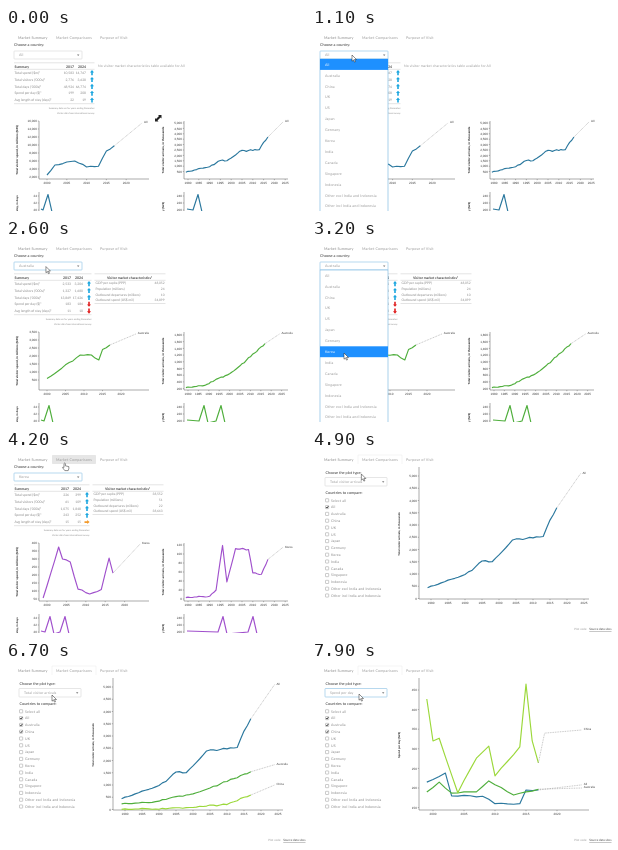
An HTML page for the animation above (8 s loop, 300 by 183 pixels).

```html
<!DOCTYPE html>
<html lang="en">
<head>
<meta charset="utf-8">
<title>Visitor market dashboard</title>
<style>
  html, body { margin: 0; width: 100%; height: 100%; overflow: hidden; background: #fff; }
  svg { display: block; width: 300px; height: 183px; font-family: Lato, "Open Sans", sans-serif; text-rendering: geometricPrecision; }
  .axis { font-family: "Liberation Sans", Arial, sans-serif; }
</style>
</head>
<body>
<svg id="stage" viewBox="0 0 300 183"></svg>
<script>
const LOOP = 8000;
const LAST_YEAR = 2017;
const FOCUS = '#6fb1dd';
const COLORS = { All: '#2b789e', Australia: '#4fae3c', China: '#9bd83a', Korea: '#a050cc' };
const COUNTRIES = ['All', 'Australia', 'China', 'UK', 'US', 'Japan', 'Germany', 'Korea', 'India',
  'Canada', 'Singapore', 'Indonesia', 'Other excl India and Indonesia', 'Other incl India and Indonesia'];
const PLOTS = ['Total visitor arrivals', 'Total spend', 'Spend per day', 'Total days', 'Length of stay'];

// Turning points by year; the years between are interpolated
const ARRIVALS = {
  All: { 1979: 440, 1988: 870, 1992: 1140, 1995: 1530, 1998: 1500, 2004: 2390, 2013: 2530, 2015: 3200, 2017: 3700, 2024: 5100 },
  Australia: { 1979: 230, 1987: 280, 1999: 610, 2005: 880, 2017: 1540, 2024: 1830 },
  China: { 1979: 5, 1997: 50, 2002: 130, 2010: 200, 2015: 500, 2017: 590, 2024: 1000 },
  Korea: { 1979: 3, 1990: 6, 1993: 20, 1996: 119, 1998: 38, 2002: 112, 2008: 110, 2010: 58, 2014: 55, 2017: 88, 2024: 115 }
};
const SPEND = {
  All: { 2000: 2500, 2002: 5000, 2007: 6000, 2010: 4500, 2013: 4700, 2015: 8500, 2017: 9800, 2024: 15500 },
  Australia: { 2000: 600, 2009: 2060, 2012: 2060, 2014: 1750, 2015: 2400, 2017: 2690, 2024: 3375 },
  Korea: { 1999: 56, 2003: 375, 2004: 300, 2006: 281, 2008: 112, 2011: 81, 2014: 110, 2016: 306, 2017: 212, 2024: 394 }
};
const DAILY = {
  All: { 1999: 215, 2002: 238, 2003: 180, 2008: 179, 2010: 160, 2014: 160, 2015: 195, 2017: 195, 2024: 208 },
  Australia: { 1999: 190, 2001: 215, 2003: 187, 2007: 190, 2009: 218, 2013: 182, 2017: 197, 2024: 200 },
  China: { 1999: 427, 2000: 320, 2001: 327, 2004: 188, 2007: 276, 2009: 307, 2010: 231, 2014: 305, 2015: 465, 2016: 320, 2017: 264, 2018: 340, 2024: 348 }
};

const stage = document.getElementById('stage');
const timed = [];

function el(parent, tag, attrs = {}, content) {
  const node = document.createElementNS('http://www.w3.org/2000/svg', tag);
  for (const key in attrs) node.setAttribute(key, attrs[key]);
  if (content !== undefined) node.textContent = content;
  return parent.appendChild(node);
}

// A group visible from one time to another
function during(parent, from, to) {
  const node = el(parent, 'g');
  timed.push({ node, from, to });
  return node;
}

// y is the middle of the line of text
function text(parent, x, y, content, size = 3.4, fill = '#888', attrs = {}) {
  return el(parent, 'text', { x, y: y + size * 0.36, 'font-size': size, fill, ...attrs }, content);
}
const right = { 'text-anchor': 'end' };
const middle = { 'text-anchor': 'middle' };
const bold = { 'font-weight': 700 };
const spaced = { 'letter-spacing': 0.13 };

function rule(parent, d, stroke = '#bbb', width = 0.4) {
  return el(parent, 'path', { d, stroke, 'stroke-width': width, fill: 'none', 'stroke-linejoin': 'round' });
}

// Ticks are [first position, spacing, first label, label step, count]; returns the scales
function axes(parent, { x, top, base, end, title, titleX, titleY, titleSize = 2.9, yTicks, xTicks }) {
  const g = el(parent, 'g', { class: 'axis' });
  rule(g, `M${x} ${top}V${base}H${end}`, '#555', 0.5);
  const [y0, dy, v0, dv, ny] = yTicks;
  for (let i = 0; i < ny; i++) {
    const y = y0 + i * dy;
    rule(g, `M${x - 1.2} ${y}H${x}`, '#555');
    text(g, x - 2, y, (v0 + i * dv).toLocaleString('en-US'), 3.1, '#333', right);
  }
  const [x0, dx, year0, step, nx] = xTicks;
  for (let i = 0; i < nx; i++) {
    const tx = x0 + i * dx;
    rule(g, `M${tx} ${base}v1.2`, '#555');
    text(g, tx, base + 4, year0 + i * step, 3.1, '#333', middle);
  }
  text(g, 0, 0, title, titleSize, '#222',
    { ...middle, ...bold, transform: `translate(${titleX} ${titleY}) rotate(-90)` });
  return {
    x: year => x0 + (year - year0) / step * dx,
    y: value => y0 + (value - v0) / dv * dy
  };
}

function valueAt(data, year) {
  const years = Object.keys(data).map(Number);
  const next = years.find(y => y >= year);
  if (next === year) return data[year];
  const prev = years.filter(y => y < year).pop();
  return data[prev] + (data[next] - data[prev]) * (year - prev) / (next - prev);
}

// Small repeatable unevenness for the interpolated years
function wobble(year) {
  const n = Math.sin(year * 12.9898) * 43758.5453;
  return (n - Math.floor(n) - 0.5) * 1.4;
}

function series(parent, name, data, scale) {
  const years = Object.keys(data).map(Number);
  const at = (year, shift = 0) => `${scale.x(year).toFixed(2)} ${(scale.y(valueAt(data, year)) + shift).toFixed(2)}`;
  const past = [];
  for (let year = years[0]; year <= LAST_YEAR; year++) past.push(at(year, year in data ? 0 : wobble(year)));
  rule(parent, 'M' + past.join('L'), COLORS[name], 1.15);
  const ahead = years.filter(year => year >= LAST_YEAR);
  rule(parent, 'M' + ahead.map(year => at(year)).join('L'), '#999', 0.6).setAttribute('stroke-dasharray', '0.9 0.8');
  const end = ahead.pop();
  text(parent, scale.x(end) + 2, scale.y(data[end]) - 0.7, name, 2.9, '#333');
}

function select(parent, x, y, w, h) {
  const box = el(parent, 'rect', { x, y, width: w, height: h, rx: 0.6, fill: '#fff', stroke: '#ccc', 'stroke-width': 0.5 });
  el(parent, 'path', { d: `M${x + w - 5} ${y + h / 2 - 0.6}h2.4l-1.2 1.6z`, fill: '#777' });
  return box;
}

function arrow(parent, x, y, dir) {
  const turn = { up: 0, right: 90, down: 180 }[dir];
  const fill = { up: '#1ba6df', right: '#f39a2b', down: '#e02020' }[dir];
  el(parent, 'path', { d: 'M0-2.6L2-.2H.8V2.5H-.8V-.2H-2Z', fill, transform: `translate(${x} ${y}) rotate(${turn})` });
}

const ROWS = ['Total spend ($m)¹', "Total visitors ('000s)²", "Total days ('000s)³", 'Spend per day ($)⁴', 'Avg length of stay (days)⁵'];
const TRAITS = ['GDP per capita (PPP)', 'Population (millions)', 'Outbound departures (millions)', 'Outbound spend (US$ mil)'];

function summaryTable(g, { arrowX, before, after, dirs, traits }) {
  const a = arrowX - 18, b = arrowX - 6, end = arrowX + 2.5;
  text(g, 8.5, 38.3, 'Summary', 3.5, '#444', bold);
  text(g, a, 38.3, '2017', 3.5, '#444', { ...right, ...bold });
  text(g, b, 38.3, '2024', 3.5, '#444', { ...right, ...bold });
  rule(g, `M8 34.8H${end}M8 41.3H${end}M8 75.7H${end}`);
  ROWS.forEach((name, i) => {
    const y = 44.7 + i * 6.85;
    text(g, 8.5, y, name, 3.4);
    text(g, a, y, before[i], 3.3, '#888', right);
    text(g, b, y, after[i], 3.3, '#888', right);
    arrow(g, arrowX, y, dirs[i]);
  });
  text(g, end, 80, 'Summary data are for years ending December', 2.3, '#888', right);
  text(g, end, 85, 'Visitor data from international survey', 2.3, '#888', right);
  if (!traits) {
    text(g, 92, 37.6, 'No visitor market characteristics table available for All', 3.4, '#999', spaced);
    return;
  }
  const x = end + 3;
  rule(g, `M${x} 34.8h71M${x} 41.3h71M${x} 64.5h71`);
  text(g, x + 35, 38.3, 'Visitor market characteristics⁶', 3.4, '#444', { ...middle, ...bold });
  TRAITS.forEach((name, i) => {
    const y = 44.3 + i * 5.6;
    text(g, x + 1, y, name, 3.3);
    text(g, x + 70, y, traits[i], 3.2, '#888', right);
  });
}

// A partly hidden curve with sharp peaks
function spikes(g, color, start, peaks) {
  rule(g, `M${start} 181` + peaks.map(x => `L${x - 5} 182L${x} 166.5L${x + 4} 184`).join(''), color, 1.15);
}

function summary(from, to, name, s) {
  const g = during(stage, from, to);
  summaryTable(g, s);
  const left = { x: 33, end: 143, titleX: 11, xTicks: [41, s.spendStep, 2000, 5, 5] };
  const rightSide = { x: 178, end: 282, titleX: 157, xTicks: [182, s.visitStep, 1980, 5, 10] };
  const upper = { top: 93, base: 151, titleY: 122 };
  const lower = { top: 164, base: 190, titleY: 187, titleSize: 2.7 };
  series(g, name, SPEND[name], axes(g, { ...left, ...upper, title: 'Total visitor spend, in millions (NZ$)', yTicks: s.spendTicks }));
  series(g, name, ARRIVALS[name], axes(g, { ...rightSide, ...upper, title: 'Total visitor arrivals, in thousands', yTicks: s.visitTicks }));
  axes(g, { ...left, ...lower, title: 'Average length of stay, in days', yTicks: [168, 7, 24, -2, 3] });
  axes(g, { ...rightSide, ...lower, title: 'Spend per day (NZ$)', yTicks: [168, 7, 240, -20, 3] });
  spikes(g, COLORS[name], 35, s.stayPeaks);
  spikes(g, COLORS[name], 181, s.dailyPeaks);
}

summary(0, 2100, 'All', {
  arrowX: 86, dirs: ['up', 'up', 'up', 'up', 'up'],
  before: ['10,583', '2,776', '48,924', '199', '22'], after: ['14,767', '3,628', '66,774', '208', '19'],
  spendTicks: [93, 8, 16000, -2000, 8], spendStep: 19.8, stayPeaks: [42],
  visitTicks: [95, 5.4, 5000, -500, 10], visitStep: 10.8, dailyPeaks: [192]
});
summary(2100, 3600, 'Australia', {
  arrowX: 83, dirs: ['up', 'up', 'up', 'down', 'down'],
  before: ['2,533', '1,327', '13,869', '183', '11'], after: ['3,204', '1,680', '17,426', '184', '10'],
  traits: ['48,052', '24', '10', '34,899'],
  spendTicks: [93, 8, 3500, -500, 7], spendStep: 18.5, stayPeaks: [43],
  visitTicks: [96, 6.7, 1800, -200, 9], visitStep: 10.4, dailyPeaks: [198, 215]
});
summary(3600, 4700, 'Korea', {
  arrowX: 81, dirs: ['up', 'up', 'up', 'up', 'right'],
  before: ['226', '61', '1,075', '243', '15'], after: ['399', '109', '1,848', '252', '15'],
  traits: ['38,552', '51', '22', '38,643'],
  spendTicks: [93, 8, 400, -50, 8], spendStep: 19.4, stayPeaks: [44, 59],
  visitTicks: [95, 9, 120, -20, 7], visitStep: 10.8, dailyPeaks: [217, 247]
});

// Tabs
el(during(stage, 4100, 4700), 'rect', { x: 46, y: 5, width: 44, height: 9, rx: 0.8, fill: '#e6e6e6' });
text(stage, 12, 9.5, 'Market Summary', 3.7, '#888', spaced);
text(stage, 50, 9.5, 'Market Comparisons', 3.7, '#999', spaced);
text(stage, 94, 9.5, 'Purpose of Visit', 3.7, '#999', spaced);

// Country picker
const picker = during(stage, 0, 4700);
text(picker, 8, 17, 'Choose a country:', 3.8, '#333');
const countryBox = select(picker, 8, 23, 68, 8);
[['All', 0, 1850], ['Australia', 1850, 3450], ['Korea', 3450, 4700]].forEach(([name, from, to]) =>
  text(during(picker, from, to), 13, 27, name, 3.6, '#999', spaced));

function menu(x, y, w, step, names) {
  const node = el(stage, 'g');
  el(node, 'rect', { x, y, width: w, height: step * names.length, fill: '#fff', stroke: FOCUS, 'stroke-width': 0.6 });
  const mark = el(node, 'rect', { x, width: w, height: step, fill: '#1e90ff' });
  const items = names.map((name, i) => text(node, x + 5, y + step * (i + 0.5), name, 3.6, '#999', spaced));
  return (open, pointerY, chosen) => {
    toggle(node, open);
    const over = Math.floor((pointerY - y) / step);
    const index = over < 0 ? chosen : over;
    mark.setAttribute('y', y + index * step);
    items.forEach((item, i) => item.setAttribute('fill', i === index ? '#fff' : '#999'));
  };
}

// Comparison tab
const SWAP = 7600;
const compare = during(stage, 4700, LOOP);
rule(compare, 'M46 14V5H90V14', '#e8e8e8', 0.5);
text(compare, 13.5, 23, 'Choose the plot type:', 3.8, '#333');
const plotBox = select(compare, 13, 27.5, 62, 8.5);
text(during(compare, 4700, 7400), 18, 31.8, PLOTS[0], 3.5, '#999', spaced);
text(during(compare, 7400, LOOP), 18, 31.8, PLOTS[2], 3.5, '#999', spaced);
text(compare, 13.5, 42.8, 'Countries to compare:', 3.8, '#333');
const checkedAt = { All: 4700, Australia: 5400, China: 6000 };
['Select all', ...COUNTRIES].forEach((name, i) => {
  const y = 50.3 + i * 6.8;
  el(compare, 'rect', { x: 13.5, y: y - 1.6, width: 3.2, height: 3.2, rx: 0.4, fill: '#fff', stroke: '#999', 'stroke-width': 0.5 });
  if (name in checkedAt) rule(during(compare, checkedAt[name], LOOP), `M14.1 ${y}l.9 1 1.4-2`, '#333', 0.9);
  text(compare, 19, y, name, 3.5, '#888', spaced);
});
text(compare, 275, 179, 'Plot code:', 2.9, '#999', right);
text(compare, 299.5, 179, 'Source data sites', 3, '#444', { ...right, 'text-decoration': 'underline' });

const frame = { x: 107, top: 17, base: 149, end: 277, titleX: 87, titleY: 84, titleSize: 2.7 };
const arrivals = axes(during(compare, 4700, SWAP), { ...frame, title: 'Total visitor arrivals, in thousands',
  yTicks: [26, 12.25, 5000, -500, 11], xTicks: [119, 17, 1980, 5, 10] });
const daily = axes(during(compare, SWAP, LOOP), { ...frame, title: 'Spend per day (NZ$)',
  yTicks: [29, 19.6, 450, -50, 7], xTicks: [121, 31, 2000, 5, 5] });
for (const name in checkedAt) {
  series(during(compare, checkedAt[name] + 150, SWAP), name, ARRIVALS[name], arrivals);
  series(during(compare, SWAP, LOOP), name, DAILY[name], daily);
}

const countryMenu = menu(8, 31, 68, 10.9, COUNTRIES);
const plotMenu = menu(13, 36, 62, 9, PLOTS);

// Pointer stops: arrival time, x, y
const TRAVEL = 500;
const STOPS = [[0, 150, 89], [800, 40, 27], [1650, 38, 47], [2650, 40, 27], [3200, 32, 114], [4150, 58, 13],
  [5250, 18, 64], [5850, 25, 70], [6700, 46, 34], [7300, 40, 58], [7900, 47, 33]];
const outline = { fill: '#fff', stroke: '#222', 'stroke-width': 0.5, 'stroke-linejoin': 'round' };
const pointer = el(stage, 'g');
const diagonal = el(pointer, 'path', { d: 'M-1 4.5V1L0 2 3-1 2-2H5.5V1.5L4.5.5 1.5 3.5 2.5 4.5Z', fill: '#222' });
const plain = el(pointer, 'path', { d: 'M0 0V6.2L1.5 4.9 2.5 7.1 3.5 6.7 2.5 4.5H4.5Z', ...outline });
const hand = el(pointer, 'path', { d: 'M0 .6Q.7-.6 1.4.6V2.8L4.8 3.6Q5.2 5.8 4.2 7.6H.8L-1.5 4.6Q-1.4 3.6 0 4.4Z', ...outline });

const within = (t, ...spans) => spans.some(([a, b]) => t >= a && t < b);
function toggle(node, on) { node.style.display = on ? '' : 'none'; }

function place(t) {
  let [, x, y] = STOPS[0];
  for (const [arrive, nx, ny] of STOPS.slice(1)) {
    const k = Math.min(1, Math.max(0, 1 - (arrive - t) / TRAVEL));
    const ease = k * k * (3 - 2 * k);
    x += (nx - x) * ease;
    y += (ny - y) * ease;
  }
  return [x, y];
}

function draw(now) {
  const t = Math.floor((now % LOOP) / 100) * 100;
  timed.forEach(({ node, from, to }) => toggle(node, within(t, [from, to])));
  const [x, y] = place(t);
  pointer.setAttribute('transform', `translate(${x.toFixed(2)} ${y.toFixed(2)})`);
  const onHand = within(t, [4100, 4800], [5100, 6300]);
  toggle(diagonal, t < 100);
  toggle(hand, onHand);
  toggle(plain, t >= 100 && !onHand);
  countryMenu(within(t, [1000, 1850], [2800, 3450]), y, t < 1850 ? 0 : 1);
  plotMenu(within(t, [6900, 7400]), y, 0);
  countryBox.setAttribute('stroke', t >= 1000 ? FOCUS : '#ccc');
  plotBox.setAttribute('stroke', t >= 6900 ? FOCUS : '#ccc');
}

const start = performance.now();
function tick() {
  draw(performance.now() - start);
  requestAnimationFrame(tick);
}
tick();
</script>
</body>
</html>
```
